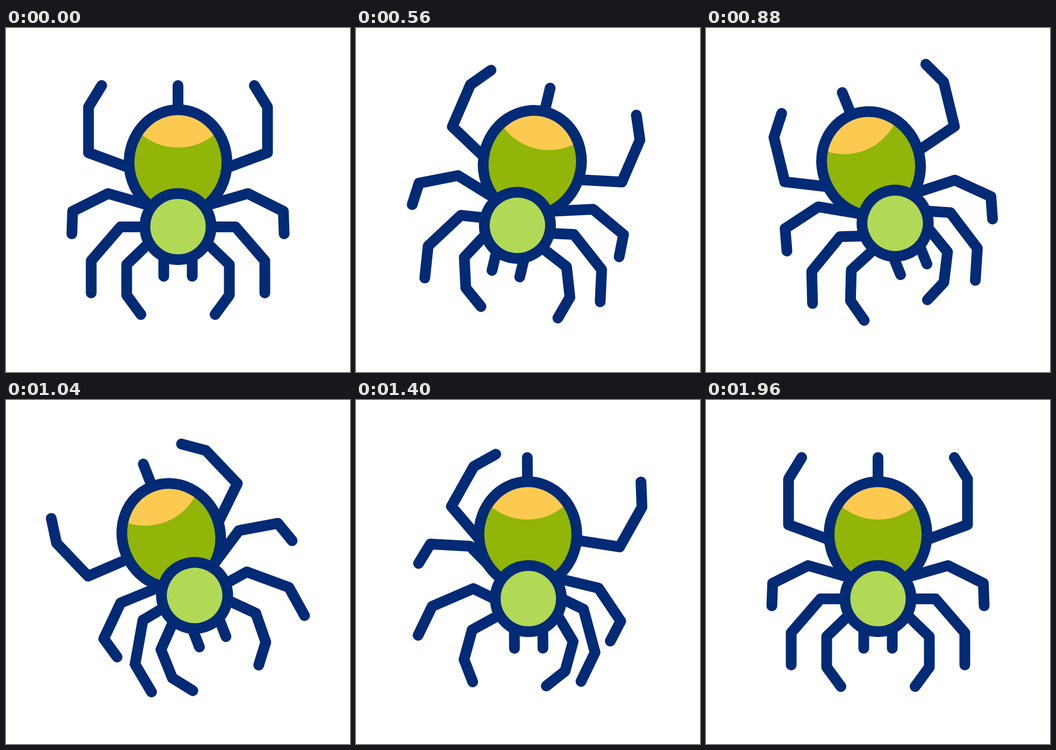
Animation, 640 px wide and 640 px high, one loop 2000 ms. Source, as an HTML page:

```html
<!DOCTYPE html>
<html lang="en">
<head>
<meta charset="utf-8">
<title>Spider</title>
<style>
  html, body { margin: 0; width: 100%; height: 100%; overflow: hidden; background: #fff; }
  svg { display: block; width: 100vw; height: 100vh; }
</style>
</head>
<body>
<svg viewBox="0 0 640 640">
  <defs>
    <clipPath id="belly"><ellipse cx="320" cy="250" rx="91" ry="98"/></clipPath>
  </defs>
  <g id="spider" fill="none" stroke="#032a75" stroke-width="20" stroke-linecap="round" stroke-linejoin="round">
    <g id="legs"></g>
    <path d="M320 107V150M293.5 462V425M346.5 462V425"/>
    <g clip-path="url(#belly)" stroke="none">
      <rect x="220" y="140" width="200" height="220" fill="#91b508"/>
      <circle cx="320" cy="116.5" r="106" fill="#fcca51"/>
    </g>
    <ellipse cx="320" cy="250" rx="91" ry="98"/>
    <circle cx="320" cy="369.5" r="61.5" fill="#b1d955"/>
  </g>
</svg>
<script>
const LOOP = 2000, STEP = 40;
const spider = document.getElementById("spider");
const legGroup = document.getElementById("legs");

// Each track is a list of [time, angle] keys.
const bodyTrack = [[0, 0], [380, 22.9], [940, -23], [1450, 0]];

// Left-side joints from foot to hip; the right side is mirrored.
const shapes = [
  [[178, 107], [153.5, 147], [153.5, 232], [232, 261]],
  [[122.5, 383], [124, 341], [190, 308], [270, 331]],
  [[158.5, 493], [158.5, 433], [213, 370], [258, 370]],
  [[251, 533], [224.5, 497], [224.5, 440], [267, 399]]
];
const endTimes = [1826, 1917, 1952, 1964];

function legTrack(i, right) {
  const front = i === 0;
  const firstTime = front ? 312 : right ? 321 + 39 * i : 276 + 46 * i;
  const firstAngle = front || !right ? -29 : -31;
  const peak = front ? 26 : right ? 30 : 24.5;
  const lag = 40 * i;
  return [
    [0, 0],
    [firstTime, firstAngle],
    [(front ? 712 : 718) + lag, peak],
    [1125 + lag, -26.5],
    [1365 + lag, 30],
    [endTimes[i], 0]
  ];
}

function makeLeg(shape, i, right) {
  const points = shape.map(([x, y]) => [right ? 640 - x : x, y]);
  const node = document.createElementNS("http://www.w3.org/2000/svg", "polyline");
  node.setAttribute("points", points.join(" "));
  legGroup.append(node);
  return { node, hip: points[3], track: legTrack(i, right) };
}

const legs = shapes.flatMap((shape, i) => [makeLeg(shape, i, false), makeLeg(shape, i, true)]);

function ease(s) {
  const a = s ** 1.8, b = (1 - s) ** 1.8;
  return a / (a + b);
}

function angleAt(track, t) {
  const next = track.findIndex(([time]) => time > t);
  if (next < 0) return track[track.length - 1][1];
  const [t0, a0] = track[next - 1], [t1, a1] = track[next];
  return a0 + (a1 - a0) * ease((t - t0) / (t1 - t0));
}

function rotate(node, angle, [x, y]) {
  node.setAttribute("transform", `rotate(${angle.toFixed(3)} ${x} ${y})`);
}

function render(time) {
  const t = Math.floor((time % LOOP) / STEP) * STEP;
  rotate(spider, angleAt(bodyTrack, t), [320, 284.5]);
  for (const { node, hip, track } of legs) rotate(node, angleAt(track, t), hip);
}

const start = performance.now();
function tick() {
  render(performance.now() - start);
  requestAnimationFrame(tick);
}
tick();
</script>
</body>
</html>
```
